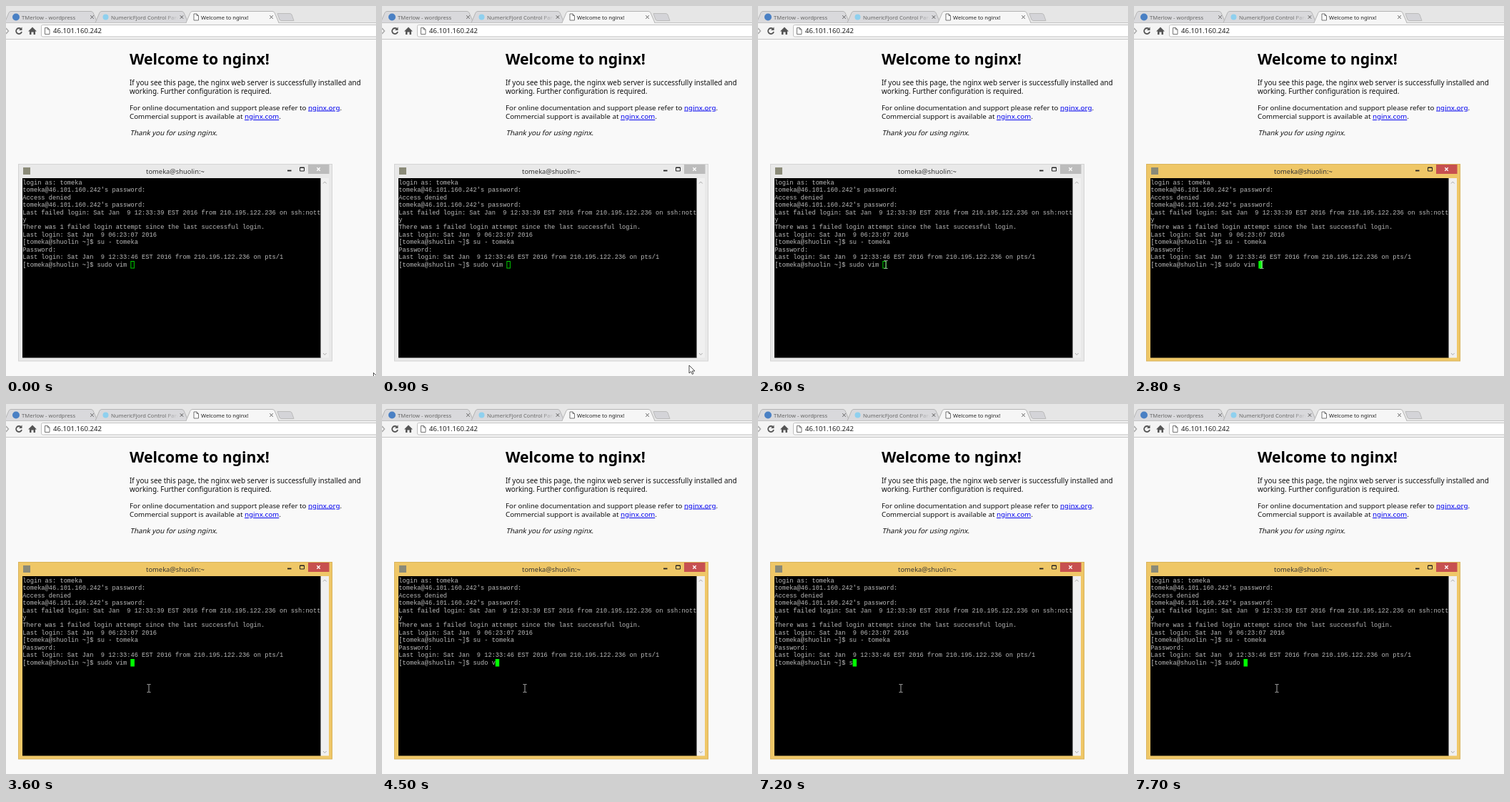
These frames come from a looping animation (518x518 px, 8 s). An HTML page:

```html
<!DOCTYPE html>
<html lang="en">
<head>
<meta charset="utf-8">
<title>Terminal over a web page</title>
<style>
  html, body { margin: 0; width: 100%; height: 100%; overflow: hidden; }
  svg { display: block; width: 518px; height: 518px; background: #f9f9f9; }
  text { font-family: "Noto Sans", sans-serif; white-space: pre; }
  .page { font-size: 9.8px; fill: #111; }
  .page .link { fill: #00e; text-decoration: underline; }
  .tabs text { font-size: 7.65px; }
  .line { fill: none; stroke: #555; }
  .dark { stroke: #222; }
  .pale { stroke: #aaa; }
  #term text { font: 8.7px "Liberation Mono", monospace; fill: #bbb; }
  #frame { fill: #e9e9e9; stroke: #d4d4d4; }
  #close { fill: #bcbcbc; }
  #caret { fill: none; stroke: #0c0; }
  .active #frame { fill: #efc767; stroke: #d9b45c; }
  .active #close { fill: #c75050; }
  .active #caret { fill: #0f0; stroke: #0f0; }
</style>
</head>
<body>
<svg viewBox="0 0 518 518">
  <defs>
    <path id="tab" d="M0 23.5L6 9.5Q7 7.5 9 7.5H121Q123 7.5 124 9.5L130 23.5" stroke="#b4b4b4"/>
    <path id="x" d="M-2.2-2.2L2.2 2.2M2.2-2.2L-2.2 2.2"/>
    <path id="doc" d="M-3-4.5H1L3.5-2V4.5H-3ZM1-4.5V-2H3.5" fill="#fff" stroke="#666" stroke-width=".9"/>
    <linearGradient id="fade" gradientUnits="userSpaceOnUse" x1="222" x2="241">
      <stop stop-color="#666"/><stop offset="1" stop-color="#666" stop-opacity="0"/>
    </linearGradient>
  </defs>

  <g class="tabs">
    <rect width="518" height="24" fill="#e6e6e6"/>
    <use href="#tab" x="-2" fill="#d9d9dc"/>
    <use href="#tab" x="125" fill="#d9d9dc"/>
    <path d="M380 10.5H397Q399 10.5 400 12L403 20.5H386Q384 20.5 383 19Z" fill="#d4d4d8" stroke="#bbb"/>
    <rect y="23.5" width="518" height="23" fill="#f4f4f4"/>
    <path d="M0 23.5H518M0 46.5H518" stroke="#c4c4c4"/>
    <use href="#tab" x="252" fill="#f6f6f6"/>
    <path d="M253 24H381" stroke="#f5f5f5" stroke-width="2"/>
    <circle cx="14" cy="15.5" r="5" fill="#4a80c4"/>
    <circle cx="139.5" cy="15.5" r="4" fill="#8fd0ee"/>
    <use href="#doc" x="266" y="15.5"/>
    <text x="22" y="18.5" fill="#666">TMerlow - wordpress</text>
    <text x="147" y="18.5" fill="url(#fade)">NumericFjord Control Panel</text>
    <text x="273" y="18.5" fill="#222">Welcome to nginx!</text>
    <g class="line">
      <use href="#x" x="120.5" y="15.5"/><use href="#x" x="246" y="15.5"/><use href="#x" x="371.5" y="15.5"/>
    </g>
  </g>

  <rect x="49.5" y="26.5" width="480" height="16.5" rx="2" fill="#fff" stroke="#c0c0c0"/>
  <use href="#doc" x="57.5" y="35"/>
  <text x="66" y="38.4" font-size="9.6" fill="#222">46.101.160.242</text>
  <path class="line pale" d="M0 31L3.5 35L0 39" stroke-width="1.5"/>
  <path class="line" d="M21 32.2A4 4 0 1 0 22 36" stroke-width="1.8"/>
  <path d="M22.5 29.5V34H18Z" fill="#555"/>
  <path d="M37 29.5L43 35.5H41V40H38.5V36.5H35.5V40H33V35.5H31Z" fill="#555"/>

  <g class="page">
    <text x="173" y="82" font-size="21.2" font-weight="700" fill="#000">Welcome to nginx!</text>
    <g font-size="9.93">
      <text x="173" y="110.5">If you see this page, the nginx web server is successfully installed and</text>
      <text x="173" y="123">working. Further configuration is required.</text>
    </g>
    <text x="173" y="145.5">For online documentation and support please refer to <tspan class="link">nginx.org</tspan>.</text>
    <text x="173" y="158">Commercial support is available at <tspan class="link">nginx.com</tspan>.</text>
    <text transform="translate(173.5 180.5) skewX(-14)">Thank you for using nginx.</text>
  </g>

  <g id="window">
    <rect id="frame" x="17.5" y="221.5" width="439" height="275.5"/>
    <rect x="24" y="226" width="10" height="10" fill="#8a8a78"/>
    <text x="237" y="235" font-size="9.35" text-anchor="middle" fill="#333">tomeka@shuolin:~</text>
    <path class="line dark" d="M394 230.5H399.5" stroke-width="1.8"/>
    <path class="line dark" d="M411.5 226H417.5V231H411.5ZM411 226.5H418"/>
    <rect id="close" x="423" y="222" width="29.5" height="13"/>
    <use href="#x" x="437.5" y="228.5" stroke="#fff" stroke-width="1.3"/>
    <rect x="23" y="241" width="418" height="251.5"/>
    <rect x="440.5" y="241" width="11.5" height="251.5" fill="#f0f0f0"/>
    <path class="line pale" d="M444 248.5L446.3 246L448.6 248.5M444 486L446.3 488.5L448.6 486"/>
    <g id="term"></g>
    <rect id="caret" y="357.5" width="4.5" height="9.5"/>
  </g>

  <path id="beam" d="M-2.5-5.5H-.7L0-5L.7-5.5H2.5M0-5V5M-2.5 5.5H-.7L0 5L.7 5.5H2.5" fill="none" stroke="#bbb" stroke-width=".9"/>
  <path id="arrow" d="M0 0V11L2.6 8.7L4.3 12.5L6 11.7L4.4 8H8Z" fill="#fff" stroke="#222" stroke-width=".8"/>
</svg>
<script>
const LOOP = 8000, STEP = 100, FOCUS_TIME = 2800;
const CELL = 5.22, LEFT = 23.3, FIRST_LINE = 249.7, LEADING = 10.45;
const user = "tomeka", prompt = `[${user}@shuolin ~]$ `, command = prompt + "sudo vim ";
const lines = [
  `login as: ${user}`,
  `${user}@46.101.160.242's password:`,
  "Access denied",
  `${user}@46.101.160.242's password:`,
  "Last failed login: Sat Jan  9 12:33:39 EST 2016 from 210.195.122.236 on ssh:nott",
  "y",
  "There was 1 failed login attempt since the last successful login.",
  "Last login: Sat Jan  9 06:23:07 2016",
  `${prompt}su - ${user}`,
  "Password:",
  "Last login: Sat Jan  9 12:33:46 EST 2016 from 210.195.122.236 on pts/1",
  command
];

// Each move runs from one time to another and ends at the given values.
const pointerStart = { x: 514.5, y: 513.5 };
const pointerMoves = [
  { from: 700, to: 900, x: 430, y: 503 },
  { from: 1000, to: 1500, x: 187, y: 361 },
  { from: 1600, to: 1800, x: 176, y: 368 },
  { from: 2400, to: 2600, x: 179, y: 362 },
  { from: 2800, to: 3300, x: 200, y: 398 }
];
const typingStart = { typed: "sudo vim ".length };
const typingMoves = [
  { from: 3900, to: 4000, typed: "sudo vim".length },
  { from: 4400, to: 4600, typed: "sudo ".length },
  { from: 4700, to: 5000, typed: "su".length },
  { from: 5600, to: 5700, typed: 0 },
  { from: 7100, to: 7500, typed: "sudo ".length }
];
const linear = p => p;
const easeOut = p => Math.sin(p * Math.PI / 2);

function follow(start, moves, t, ease) {
  const state = { ...start };
  for (const move of moves) {
    const p = ease(Math.min(1, Math.max(0, (t - move.from) / (move.to - move.from))));
    for (const key in state) state[key] += (move[key] - state[key]) * p;
  }
  return state;
}

const $ = id => document.getElementById(id);
const rows = lines.map((line, i) => {
  const row = document.createElementNS("http://www.w3.org/2000/svg", "text");
  row.setAttribute("x", LEFT);
  row.setAttribute("y", FIRST_LINE + i * LEADING);
  row.textContent = line;
  return $("term").appendChild(row);
});
const commandRow = rows.at(-1);

function place(id, x, y, visible) {
  $(id).setAttribute("transform", `translate(${x} ${y})`);
  $(id).style.display = visible ? "" : "none";
}

function draw(now) {
  const t = Math.floor(now % LOOP / STEP) * STEP;
  const { x, y } = follow(pointerStart, pointerMoves, t, easeOut);
  const { typed } = follow(typingStart, typingMoves, t, linear);
  const count = prompt.length + Math.floor(typed + 1e-6);
  const overTerminal = x > 23 && x < 441 && y > 241 && y < 492;

  $("window").classList.toggle("active", t >= FOCUS_TIME);
  commandRow.textContent = command.slice(0, count);
  $("caret").setAttribute("x", LEFT + count * CELL + 0.2);
  place("beam", x, y, overTerminal);
  place("arrow", x, y, !overTerminal);
  requestAnimationFrame(draw);
}
draw(performance.now());
</script>
</body>
</html>
```
